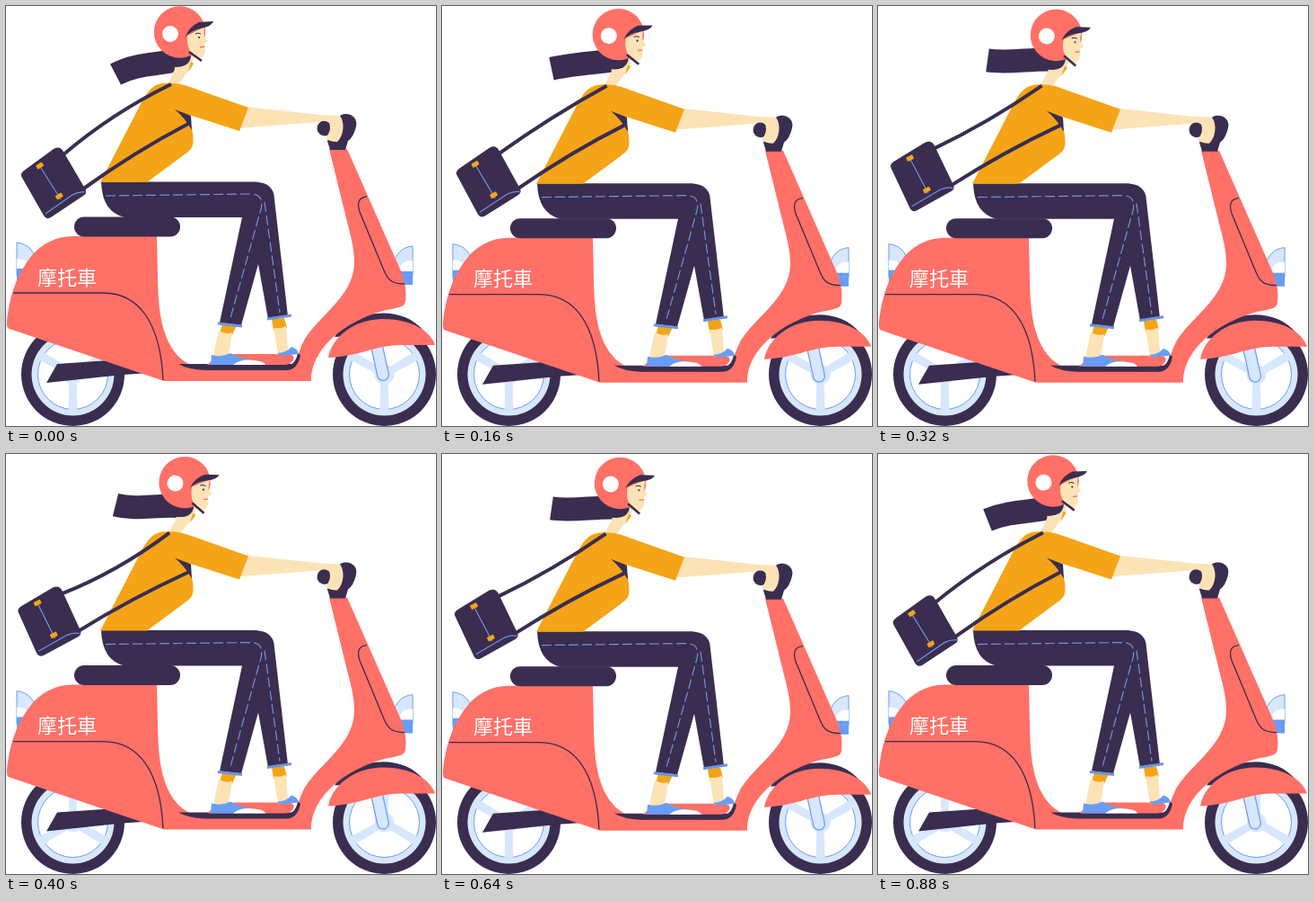
An HTML page that plays this animation: 479x467 px, repeating every 0.96 s.

```html
<!DOCTYPE html>
<html lang="zh-Hant">
<head>
<meta charset="utf-8">
<title>摩托車</title>
<style>
  html, body { margin: 0; width: 100%; height: 100%; overflow: hidden; background: #fff; }
  svg { display: block; width: 100vw; height: 100vh; }
  .coral { fill: #ff7067; }
  .dark { fill: #3a2d50; }
  .gold { fill: #f4a416; }
  .skin { fill: #fbe3b6; }
  .pale { fill: #d7e7fd; }
  .blue { fill: #689df3; }
  .white { fill: #fff; }
  .line { fill: none; stroke: #3a2d50; stroke-width: 1.3; }
  .strap { fill: none; stroke: #3a2d50; stroke-width: 4; }
  .hair { fill: none; stroke: #3a2d50; stroke-width: 26; }
  .seam { fill: none; stroke: #6f93dc; stroke-width: 1.2; }
  .dash { stroke-dasharray: 11 4; }
  .edge { stroke: #689df3; stroke-width: 1; }
  .fork { fill: none; stroke-linecap: round; }
  text { font: 22px "Noto Sans CJK TC", "Noto Sans CJK SC", "Noto Sans CJK JP", sans-serif; fill: #fff; }
</style>
</head>
<body>
<svg viewBox="0 0 479 467" preserveAspectRatio="none">
  <defs>
    <g id="wheel">
      <circle class="dark" r="57.5"/>
      <circle class="pale" r="46"/>
      <circle class="white edge" r="39"/>
      <g id="spokes"></g>
      <circle class="pale" r="11"/>
    </g>
  </defs>

  <use href="#wheel" x="74.5" y="409.5"/>
  <use href="#wheel" x="421.5" y="409.5"/>

  <g id="ride">
    <!-- scooter -->
    <path class="dark" d="M45 419L57 398L130 393L160 404V408L130 410Z"/>
    <path class="dark" d="M366 368C382 341 438 328 466 362Z"/>
    <path class="fork" stroke="#689df3" stroke-width="14" d="M413 378L420 410"/>
    <path class="fork" stroke="#d7e7fd" stroke-width="11.5" d="M413 378L420 410"/>
    <path class="pale edge" d="M12 263C24 264 33 273 34 286V300H12Z"/>
    <path class="white" d="M12 281Q24 280 28 292H12Z"/>
    <path class="blue" d="M12 292H30V298L24 305H12Z"/>
    <path class="pale edge" d="M453 267C441 268 433 276 431 290L437 300H453Z"/>
    <path class="white" d="M453 283Q440 282 437 295H453Z"/>
    <path class="blue" d="M435 295H453V310H441Z"/>
    <path class="coral" d="M78 256H168C169 290 169 310 170 325C173 375 192 401 222 403H305C322 403 324 390 330 376C342 348 388 325 388 285C388 270 384 255 380 240L360 159H380L440 295C446 312 446 318 445 328C444 334 440 334 434 336C395 342 340 372 340 417H176L4 359C1 358 1 356 1 350C4 325 10 300 30 276C45 261 58 256 78 256Z"/>
    <path class="coral" d="M359 391C363 368 388 348 420 348C450 348 472 360 478 377H440C412 377 392 390 359 391Z"/>
    <path class="line" d="M8 319H108C148 319 172 352 175 416"/>
    <path class="line" d="M402 212C392 213 391 220 394 229L421 294C426 306 431 309 444 309"/>
    <path class="dark" d="M192 398H318Q323 396 325 386L328 388Q325 405 312 405H222Q202 404 192 398Z"/>
    <path class="coral" d="M224 399L238 387H314Q323 388 320 394Q317 399 310 399Z"/>
    <text x="35" y="309.500">摩托車</text>
    <rect class="dark" x="76" y="234.500" width="118" height="22" rx="11"/>

    <!-- rider -->
    <path id="tail" class="hair"/>
    <g id="head">
      <path class="skin" d="M187 58L210 54L207 66L193 87Q187 92 180 88L188 70Z"/>
      <path class="gold" d="M209 64L203 74L206 62Z"/>
      <path class="dark" d="M172 50L206 51Q208 68 188 68Z"/>
      <circle class="coral" cx="193.5" cy="29" r="28.7"/>
      <path class="skin" d="M202 33L221 23Q220 31 221 34L225 39L221 42L222 50Q221 58 214 58Q208 56 205 50Q201 43 202 33Z"/>
      <path class="dark" d="M200 34Q204 23 215 18L231 17Q230 22 217 25Q207 27 200 34Z"/>
      <path class="line" d="M204 51L218 61" style="stroke-width:2.6"/>
      <path class="line" d="M211 31Q214 29 217 31" style="stroke-width:1"/>
      <circle class="dark" cx="215" cy="35" r="1.1"/>
      <path d="M216 46L221 45" stroke="#ff7067" stroke-width="1.3"/>
      <circle class="white" cx="183" cy="31" r="9"/>
    </g>

    <path class="gold" d="M241 354L257 355L252 366L238 364Z"/>
    <path class="skin" d="M237 361Q246 366 252 363L248 388Q240 393 231 388Z"/>
    <path class="gold" d="M296 348L310 347L313 358L298 361Z"/>
    <path class="skin" d="M298 358Q306 359 312 356L314 384L303 388Z"/>
    <path class="blue" d="M302 386Q312 386 318 379Q325 381 326 387L306 389Z"/>
    <path class="blue" d="M229 388Q240 391 250 386Q260 392 276 394Q288 395 288 399H228Z"/>
    <path class="white" d="M253 399Q262 392 276 394Q288 395 289 399Z"/>
    <path class="dark" d="M106 195.500H274C293 195 299 204 299 215L314 345L292 348L281 287L262 355L238 352L263 235H132Q107 229 106 195.500Z"/>
    <path class="seam dash" d="M111 211L272 209Q288 209 284 226L250 347"/>
    <path class="seam dash" d="M288 218L305 341"/>
    <path class="seam" d="M236 353L263 356M291 348L318 344" style="stroke-width:3"/>

    <path class="dark" d="M370 124Q375 118 384 121Q392 125 390 134Q387 146 381 150L378 160H361L358 150Z"/>
    <circle class="dark" cx="355" cy="136" r="8.500"/>
    <path class="skin" d="M266 112L350 121L372 122C378 130 376 145 369 151Q360 151 356 147C361 141 362 135 360 130Q355 126 348 129L258 136Z"/>
    <path class="gold" d="M174 86C162 88 157 96 150 109L105 196H157L203 162C209 157 209 152 208 142L204 121L260 139L270 113L205 90C195 86 185 85 174 86Z"/>
    <path class="dark" d="M188 115L206 122L207 138Q199 124 188 115Z"/>

    <path id="upper" class="strap"/>
    <path id="lower" class="strap"/>
    <g id="bag">
      <path class="dark" d="M20 183L53 159Q60 155 64 162L88 203Q91 208 86 211L50 235Q45 238 42 233L18 191Q15 187 20 183Z"/>
      <path class="seam" d="M37 177L61 215M44 231L74 210Q82 206 88 207"/>
      <rect class="gold" x="34" y="175" width="8" height="5" rx="1" transform="rotate(-32 38 178)"/>
      <rect class="gold" x="55" y="209" width="8" height="5" rx="1" transform="rotate(-32 59 211)"/>
    </g>
  </g>
</svg>
<script>
  const STEP = 80, STEPS = 12;
  const $ = id => document.getElementById(id);
  const set = (id, name, value) => $(id).setAttribute(name, value);

  for (const turn of [0, 120, 240]) {
    $('spokes').innerHTML +=
      `<path class="pale" d="M-4 4L-5 40H5L4 4Z" transform="rotate(${turn})"/>`;
  }

  function draw(ms) {
    const k = Math.floor(ms / STEP) % STEPS;
    const drop = 1.1 * (1 - Math.cos(k * Math.PI / 3));
    // three widths of the same swell, rising and falling once per loop
    const nod = Math.sin(k * Math.PI / STEPS);
    const wave = nod ** 1.4;
    const swing = nod ** 2;

    set('spokes', 'transform', `rotate(${60 * k})`);
    set('ride', 'transform', `translate(0 ${drop})`);
    set('head', 'transform', `translate(0 ${2 * nod}) rotate(${5.6 * nod} 195 88)`);
    set('tail', 'd', `M200 58C170 ${66 - 12 * wave} 148 62.5 122 ${76 - 21 * wave}`);
    set('bag', 'transform',
      `translate(${-5 * swing} ${-12 * swing}) rotate(${6 * swing} 53 198)`);
    set('upper', 'd',
      `M${63 - swing} ${166 - 12 * swing}Q${118 + 7 * swing} ${119 + 12 * swing} ${184 - 2 * swing} 87`);
    set('lower', 'd',
      `M${85 - 5 * swing} ${204 - 8 * swing}Q${145 - 6 * swing} ${161 - swing} 203 131`);
  }

  const start = performance.now();
  function tick() {
    draw(performance.now() - start);
    requestAnimationFrame(tick);
  }
  tick();
</script>
</body>
</html>
```
